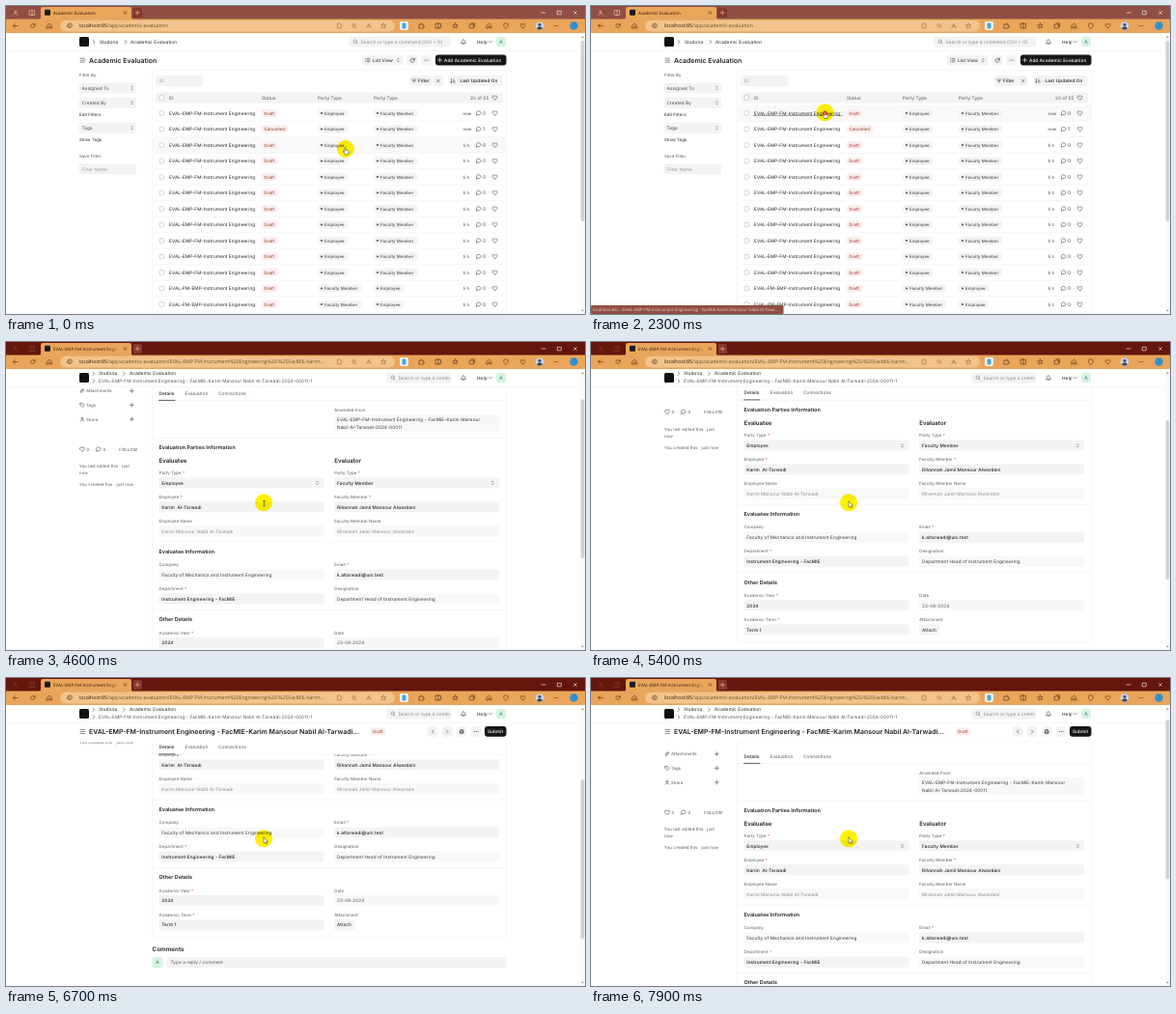
An HTML page for the animation above (8000 ms loop, 600 px wide and 319 px high).

```html
<!DOCTYPE html>
<html lang="en">
<head>
<meta charset="utf-8">
<title>Academic Evaluation</title>
<style>
html, body { margin: 0; width: 100%; height: 100%; overflow: hidden; background: #fff; }
svg { display: block; width: 600px; height: 319px; }
text { font-family: Inter, "Open Sans", sans-serif; text-rendering: geometricPrecision; white-space: pre; }
.ui text { font-family: "Open Sans", "Noto Sans", sans-serif; }
</style>
</head>
<body>
<svg id="stage" viewBox="0 0 600 319" xmlns="http://www.w3.org/2000/svg"></svg>
<script>
const INK = '#1f1f1f', GREY = '#555', SOFT = '#8a8a8a', FILL = '#f3f3f3', LINE = '#ececec';
const BAR = '#8f4f45', BAR_DARK = '#64150c', TOOL = '#e9a55a', PILL = '#f1c48c', BROWN = '#4a2a10';

const DEPT = 'Instrument Engineering', CODE = 'FacMIE';
const FULL = 'Karim Mansour Nabil Al-Tarwadi', SHORT = 'Karim\u00a0 Al-Tarwadi';
const PEER = 'Rihannah Jamil Mansour Alwardani';
const DOC = `EVAL-EMP-FM-${DEPT} - ${CODE}-${FULL}`;

// Drawing helpers; text is placed by its vertical centre.
const text = (x, y, str, { s = 4.69, w = 400, c = INK, ls = 0.02, a = 'start' } = {}) =>
  `<text x="${x}" y="${y + s * 0.364}" font-size="${s}" font-weight="${w}" fill="${c}" text-anchor="${a}" letter-spacing="${ls * s}">${str}</text>`;
const small = (x, y, str, c = GREY, w = 400) => text(x, y, str, { s: 4.33, c, w });
const rect = (x, y, w, h, fill, r = 0, extra = '') =>
  `<rect x="${x}" y="${y}" width="${w}" height="${h}" rx="${r}" fill="${fill}" ${extra}/>`;
const box = (x, y, w, h, r = 1) => rect(x, y, w, h, '#fff', r, 'stroke="#a8a8a8" stroke-width=".5"');
const icon = (x, y, d, c = '#444', sw = 0.6, fill = 'none') =>
  `<path transform="translate(${x} ${y})" d="${d}" fill="${fill}" stroke="${c}" stroke-width="${sw}" stroke-linecap="round" stroke-linejoin="round"/>`;
const hline = (x1, x2, y, c = LINE, sw = 0.5) => icon(0, 0, `M${x1} ${y}H${x2}`, c, sw);
const group = (id, body, attrs = '') => `<g id="${id}" ${attrs}>${body}</g>`;
const circle = (x, y, r, fill) => `<circle cx="${x}" cy="${y}" r="${r}" fill="${fill}"/>`;

const ICON = {
  heart: 'M0 2.3L-2.1.2C-3.2-1-2-2.5-.8-1.9L0-1.2 .8-1.9C2-2.5 3.2-1 2.1.2Z',
  bubble: 'M-2.2 2.1L-1.8 1C-3.2-.8-1.5-2.1 0-2.1 3-2.1 3 1.7 0 1.7L-.9 1.6Z',
  right: 'M-.8-1.6L.8 0-.8 1.6', left: 'M.8-1.6L-.8 0 .8 1.6', down: 'M-1.4-.7L0 .7 1.4-.7',
  updown: 'M-.8-.9L0-1.7 .8-.9M-.8 .9L0 1.7 .8 .9',
  plus: 'M-2 0H2M0-2V2', cross: 'M-1.4-1.4L1.4 1.4M1.4-1.4L-1.4 1.4',
  refresh: 'M2-.6A2.1 2.1 0 1 0 1.8 1.1M2.3-2.2V-.5H.7',
  dots: 'M-1.8 0h.01M0 0h.01M1.8 0h.01',
  menu: 'M-2.2-2H2.2M-2.2 0H2.2M-2.2 2H2.2',
  search: 'M1 1L2.2 2.2M1.4-.3A1.7 1.7 0 1 1-2-.3A1.7 1.7 0 1 1 1.4-.3',
  bell: 'M-2.2 1.4C-1.2.6-1.6-2.4 0-2.4S1.2.6 2.2 1.4ZM-.5 2.3H.5',
  home: 'M-2.5-.2L0-2.5 2.5-.2V2.5H.8V.6H-.8V2.5H-2.5Z',
  star: 'M0-2.7L.8-.8 2.7-.7 1.2.6 1.7 2.5 0 1.4-1.7 2.5-1.2.6-2.7-.7-.8-.8Z',
  square: 'M-2.4-1.4H1.4V2.4H-2.4ZM-1.2-2.6H2.6V1.2',
  split: 'M-2.6-2.3H2.6V2.3H-2.6ZM0-2.8V2.8',
  page: 'M-1.8-2.3H.6L1.8-1.1V2.3H-1.8Z',
  puzzle: 'M-2.2-1.2H-.6C-1.2-3.2 1.2-3.2.6-1.2H1.8V.2C3.6-.2 3.6 1.8 1.8 1.4V2.6H-2.2Z',
  letter: 'M-2 2L0-2.2 2 2M-1.2.5H1.2',
  shield: 'M0-2.6L2.2-1.7V.2C2.2 1.5 1.2 2.3 0 2.8-1.2 2.3-2.2 1.5-2.2.2V-1.7Z',
  back: 'M2.5 0H-2.5M-.5-2L-2.5 0-.5 2',
  person: 'M-1-.9A1 1 0 1 1 1-.9A1 1 0 1 1-1-.9M-2 2.1C-1.8.3 1.8.3 2 2.1',
  clip: 'M-1.9.4L.2-1.7C1.3-2.7 2.5-1.3 1.5-.3L-.5 1.6C-1.2 2.2-2 1.4-1.4.8L.4-.9',
  tag: 'M-2-2H0L2.2.2 .2 2.2-2 0ZM-1-1h.01',
  print: 'M-1.2-.6V-2H1.2V-.6M-1.2 1.2H-2V-.6H2V1.2H1.2M-1.2.6H1.2V2H-1.2Z',
  filter: 'M-2-1.4H2M-1.2 0H1.2M-.5 1.4H.5',
  sort: 'M-1.3-2V2M-2.2 1.1L-1.3 2-.4 1.1M.8-1.5H1.4M.8 0H2M.8 1.5H2.6',
  list: 'M-2-1.6h.01M-2 0h.01M-2 1.6h.01M-.7-1.6H2.2M-.7 0H2.2M-.7 1.6H2.2'
};
const ic = (name, x, y, c, sw) => icon(x, y, ICON[name], c, sw);

function browser() {
  const tools = ['puzzle', 'split', 'star', 'square', 'home', 'shield', 'heart'];
  const inPill = ['page', 'search', 'letter', 'star'];
  const url = (rest) => text(76, 20.3, `localhost:85<tspan fill="#6e4c28">${rest}</tspan>`, { s: 5.2, c: '#2b1808', ls: 0 });
  const tab = (str, c) => text(49, 7, str, { s: 4.55, c, ls: 0 });
  return rect(0, 0, 600, 14, BAR) + group('barDark', rect(0, 0, 600, 14, BAR_DARK)) +
    group('barIcons', ic('person', 10, 7, '#f3cfa6') + ic('split', 27, 7, '#f3cfa6')) +
    icon(0, 0, 'M34 14Q36 14 36 12V3Q36 1 38 1H128Q130 1 130 3V12Q130 14 132 14Z', 'none', 0, TOOL) +
    rect(40, 3.8, 6, 6, '#1d1d1d', 1) +
    group('tabList', tab('Academic Evaluation', '#2b1808')) +
    group('tabForm', tab(`EVAL-EMP-FM-${DEPT.slice(0, 16)}`, 'url(#fade)')) +
    ic('cross', 123.5, 7, BROWN) + rect(131.5, 2, 9.5, 10, '#85382a', 1.5) + ic('plus', 136.2, 7, '#f3cfa6') +
    icon(557, 7, 'M-2 0H2', '#fff') + icon(573.5, 7, 'M-1.8-1.8H1.8V1.8H-1.8Z', '#fff') + ic('cross', 590, 7, '#fff') +
    rect(0, 13.5, 600, 14.5, TOOL) + ic('back', 10, 20.5, BROWN) + ic('refresh', 28, 20.5, BROWN) + ic('home', 45, 20.5, BROWN) +
    rect(56, 14.7, 347, 11.8, PILL, 5.9) +
    icon(66, 20.3, 'M-2.3 0A2.3 2.3 0 1 1 2.3 0A2.3 2.3 0 1 1-2.3 0M0-.2V1.2M0-1.1h.01', BROWN) +
    group('urlList', url('/app/academic-evaluation')) +
    group('urlForm', url(`/app/academic-evaluation/EVAL-EMP-FM-${DEPT.replace(' ', '%20')}%20-%20${CODE}-${FULL.split(' ')[0]}...`)) +
    inPill.map((n, i) => ic(n, 345.5 + 15.2 * i, 20.5, '#9b6b35')).join('') +
    rect(408, 16, 9, 9, '#eef6fb', 2) + rect(410.5, 17.5, 4, 6, '#4aa3d8', 1) +
    tools.map((n, i) => ic(n, 430.5 + 17.5 * i, 20.5, BROWN)).join('') +
    circle(553, 20.5, 4.3, '#c9d6e6') + circle(553, 19.2, 1.5, '#3b4a66') +
    icon(553, 20.5, 'M-2.8 3.1C-2.4-.1 2.4-.1 2.8 3.1Q0 5.2-2.8 3.1Z', 'none', 0, '#3b4a66') +
    ic('dots', 570, 20.5, BROWN, 1) + circle(588.5, 20.5, 4.2, '#2f8fd0');
}

function navbar() {
  const find = (x, label) => rect(x, 31.5, 461 - x, 11, FILL, 3) + ic('search', x + 7, 37, '#777') + text(x + 12.5, 37, label, { c: '#888' });
  return rect(0, 28, 595, 18.6, '#fff') + hline(0, 595, 46.6) + rect(76, 32, 10, 10, '#111', 1.5) +
    group('navList', ic('right', 91, 37) + text(97, 37, 'Studoria') + ic('right', 124, 37) + text(129, 37, 'Academic Evaluation') +
      find(355, 'Search or type a command (Ctrl + G)')) +
    group('navForm', ic('right', 91, 32.7) + text(96, 32.7, 'Studoria') + ic('right', 122.5, 32.7) + text(128, 32.7, 'Academic Evaluation') +
      ic('right', 91, 40.3) + text(96, 40.3, DOC + '-2024-00011-1', { c: GREY }) + find(394, 'Search or type a comm')) +
    ic('bell', 474, 37) + text(488, 37, 'Help') + ic('down', 502, 37.2) +
    rect(508, 32, 10, 10, '#d5f3e3', 2.5) + text(513, 37, 'A', { s: 5, c: '#2a7a52', a: 'middle' });
}

const button = (x, w, name) => rect(x, 50.7, w, 11, FILL, 3) + ic(name, x + w / 2, 56.2, '#333', name === 'dots' ? 0.9 : 0.6);
const darkButton = (x, w, label, lx) => rect(x, 50.6, w, 10.8, '#171717', 3) + text(lx, 56, label, { c: '#fff', w: 500 });
const title = (str) => ic('menu', 79.3, 56.2) + text(86, 56.2, str, { s: 6.95, w: 600, ls: 0 });
const state = (x, y, w, label) => rect(x, y - 4, w, 8, '#faeeec', 3) + small(x + 2.5, y, label, '#a8473d', 450);

const ROW0 = 111, STEP = 16.5, ROWS = 13;
const rowY = (i) => ROW0 + STEP * i;

function badge(x, y, label) {
  const w = label.length > 8 ? 45.5 : 31.5;
  return rect(x, y - 4, w, 8, FILL, 3) + circle(x + 4, y, 0.9, '#333') + small(x + 7, y, label, '#383838');
}

function listRow(i) {
  const y = rowY(i), cancelled = i === 1, swap = i >= 11;
  const kinds = ['Employee', 'Faculty Member'];
  if (swap) kinds.reverse();
  return box(159, y - 2.3, 4.6, 4.6) +
    `<g clip-path="url(#idCol)">${text(169, y, `EVAL-${swap ? 'FM-EMP' : 'EMP-FM'}-${DEPT}`)}</g>` +
    (cancelled ? state(265, y, 27, 'Cancelled') : state(265, y, 16.5, 'Draft')) +
    badge(323, y, kinds[0]) + badge(381, y, kinds[1]) +
    small(473.5, y, i < 2 ? 'now' : '5 h', '#383838') + ic('bubble', 489.7, y) + text(494, y, cancelled ? '1' : '0', { s: 5.05, c: '#444' }) +
    small(499.7, y, '·') + ic('heart', 506.5, y) + hline(155, 515, y + 8.3);
}

function listPage() {
  const select = (y, label) => rect(75.5, y - 5.5, 59.5, 11, FILL, 3) + text(78.5, y, label, { c: '#444' }) + ic('updown', 130.5, y);
  const head = (x, s) => text(x, 95, s, { c: GREY });
  let out = rect(0, 46, 595, 273, '#fff') + title('Academic Evaluation') +
    rect(369, 50.7, 42, 11, FILL, 3) + ic('list', 374.7, 56.2) + text(380, 56.2, 'List View') + ic('updown', 406.3, 56.2) +
    button(415.5, 11.5, 'refresh') + button(430, 11.5, 'dots') +
    darkButton(445, 73.5, 'Add Academic Evaluation', 454) + ic('plus', 449.6, 56, '#fff') +
    small(76, 71.5, 'Filter By') + select(85, 'Assigned To') + select(100.3, 'Created By') + small(76, 112.3, 'Edit Filters', INK) +
    select(126.3, 'Tags') + small(76, 138, 'Show Tags', INK) + small(76, 155.7, 'Save Filter') +
    rect(75.5, 163.3, 59.5, 11, FILL, 3) + text(78.5, 168.8, 'Filter Name', { c: '#999' }) +
    icon(0, 0, 'M151.5 319V69Q151.5 66.5 154 66.5H516Q518.5 66.5 518.5 69V319', LINE, 0.5) +
    rect(155, 72, 49.5, 11, FILL, 3) + text(159, 77.5, 'ID', { c: '#999' }) +
    rect(418, 72, 23.5, 11, FILL, 3) + ic('filter', 422.8, 77.5) + text(427, 77.5, 'Filter', { w: 500 }) +
    rect(442.3, 72, 11, 11, FILL, 3) + ic('cross', 447.8, 77.5) +
    rect(458, 72, 56.5, 11, FILL, 3) + ic('sort', 462.8, 77.5) + text(470.5, 77.5, 'Last Updated On', { w: 500 }) +
    rect(155, 89.5, 360, 11, FILL, 3) + box(159, 92.7, 4.6, 4.6) + head(169, 'ID') + head(265, 'Status') +
    head(323, 'Party Type') + head(381, 'Party Type') + head(481, '20 of 55') + ic('heart', 506.5, 95) +
    `<rect id="hover" x="152" width="366" height="16.2" fill="#f9f9f9"/>`;
  for (let i = 0; i < ROWS; i++) out += listRow(i);
  return out + group('underline', hline(169, 260.5, 113.5, INK, 0.4));
}

function field(x, y, label, value, { need = 0, w = 400, c = INK, fill = FILL, pick = 0 } = {}) {
  const star = need ? ' <tspan fill="#d8453b">*</tspan>' : '';
  return small(x + 0.3, y, label + star) + rect(x, y + 5, 171.3, 11, fill, 3) +
    text(x + 3, y + 10.6, value, { w, c }) + (pick ? ic('updown', x + 164.3, y + 10.6) : '');
}

function formPage() {
  const L = 158.3, R = 340;
  const read = { fill: '#f8f8f8', c: '#383838' }, dim = { fill: '#f8f8f8', c: SOFT };
  const link = { need: 1, w: 500 }, pick = { need: 1, w: 450, pick: 1 };
  const heading = (y, s) => text(158.5, y, s, { s: 5.42, w: 600, ls: 0.005 });
  const sub = (x, s) => text(x, 163.5, s, { s: 6.1, w: 600, ls: 0 });
  const side = [['person', 'Assigned To', 76.7], ['clip', 'Attachments', 91.7], ['tag', 'Tags', 106.3], ['person', 'Share', 121]];
  return side.map(([n, s, y]) => ic(n, 79, y) + small(83, y, s) + ic('plus', 130.3, y)).join('') +
    ic('heart', 79, 152.1) + small(83.6, 152.1, '0') + small(89, 152.1, '·') + ic('bubble', 95.8, 152.1) + small(100.4, 152.1, '0') +
    small(117.3, 152.1, 'FOLLOW', '#444') + small(76, 169.7, 'You last edited this · just') + small(76, 176.7, 'now') +
    small(76, 188.7, 'You created this · just now') +
    rect(151.5, 66.5, 367, 324.5, 'none', 3, `stroke="${LINE}" stroke-width=".5"`) +
    rect(151.5, 68.3, 367, 11.5, '#e9f5fd', 2) + text(155, 74.2, 'Submit this document to confirm', { s: 4.5, c: '#1072ab' }) +
    ic('cross', 513.7, 74.2, '#333') +
    small(340.3, 111.2, 'Amended From') + rect(R, 116, 171.3, 17.6, '#f8f8f8', 3) +
    text(343, 121.5, `EVAL-EMP-FM-${DEPT} - ${CODE}-Karim Mansour`, { c: '#383838' }) +
    text(343, 129, 'Nabil Al-Tarwadi-2024-00011', { c: '#383838' }) +
    hline(152, 518, 140.5) + heading(149.7, 'Evaluation Parties Information') + sub(158.5, 'Evaluatee') + sub(340.3, 'Evaluator') +
    field(L, 176.3, 'Party Type', 'Employee', pick) + field(R, 176.3, 'Party Type', 'Faculty Member', pick) +
    field(L, 201.3, 'Employee', SHORT, link) + field(R, 201.3, 'Faculty Member', PEER, link) +
    field(L, 226.3, 'Employee Name', FULL, dim) + field(R, 226.3, 'Faculty Member Name', PEER, dim) +
    hline(152, 518, 248) + heading(257.9, 'Evaluatee Information') +
    field(L, 271.4, 'Company', `Faculty of Mechanics and ${DEPT}`, read) + field(R, 271.4, 'Email', 'k.altarwadi@uni.test', { need: 1, w: 450 }) +
    field(L, 296.6, 'Department', `${DEPT} - ${CODE}`, link) + field(R, 296.6, 'Designation', `Department Head of ${DEPT}`, read) +
    hline(152, 518, 318.5) + heading(328.4, 'Other Details') +
    field(L, 342, 'Academic Year', '2024', { need: 1, w: 450 }) + field(R, 342, 'Date', '23-08-2024', { c: GREY, fill: '#f8f8f8' }) +
    field(L, 367.2, 'Academic Term', 'Term 1', { need: 1, w: 450 }) + small(340.3, 367.2, 'Attachment') +
    rect(R, 372.2, 21.5, 11, FILL, 3) + text(343, 377.8, 'Attach') +
    text(151.5, 402.3, 'Comments', { s: 6.3, w: 600, ls: 0 }) + rect(151.5, 411, 11, 11, '#d5f3e3', 3) +
    text(157, 416.5, 'A', { s: 4.8, c: '#2a7a52', a: 'middle' }) + rect(166.5, 411, 352, 11, FILL, 3) +
    text(170.5, 416.5, 'Type a reply / comment', { c: GREY });
}

function formTabs() {
  return rect(151.8, -7.5, 366.4, 15, '#fff') + hline(152, 518, 7.5) + text(158.5, 0, 'Details', { w: 500 }) +
    text(185.5, 0, 'Evaluation', { c: GREY }) + text(220, 0, 'Connections', { c: GREY }) + hline(158.5, 175, 7.4, INK, 0.7);
}

function formHead() {
  return rect(0, 46, 595, 20.5, '#fff') + '<g transform="translate(0 -.7)">' + title(DOC + '...') + state(377.8, 56.2, 16, 'Draft') +
    button(437, 10.5, 'left') + button(452, 10.5, 'right') + button(467, 10.5, 'print') + button(482, 10.5, 'dots') +
    darkButton(496, 22.5, 'Submit', 499) + '</g>';
}

const scrollbar = () => rect(595, 28, 5, 291, '#fafafa') + icon(597.5, 32, 'M-1.3.8L0-.8 1.3.8Z', 'none', 0, '#777') +
  icon(597.5, 315.5, 'M-1.3-.8L0 .8 1.3-.8Z', 'none', 0, '#777') + '<rect id="thumb" x="595.6" width="3.8" rx="1.9" fill="#d2d2d2"/>';

const pointer = () =>
  group('hand', icon(0, 0, 'M-.8 5.8L-2.6 2.6Q-2.2 1.8-1.2 2.8V-1.2Q-.4-2.2.3-1.2V1.4Q2.8 1.4 3.2 2.4V4L2.4 5.8Z', '#222', 0.5, '#fff')) +
  group('arrow', icon(1, 0, 'M-1-1.2V5L.5 3.8 1.4 5.8 2.3 5.4 1.5 3.5H3.3Z', '#222', 0.45, '#fff')) +
  group('beam', icon(0.5, 0.8, 'M-1-2.5H1M0-2.5V2.5M-1 2.5H1', '#222', 0.5)) +
  group('click', `<circle id="ring" cy=".8" fill="none" stroke="#e0261b" stroke-width="1.2"/>`);

const stage = document.getElementById('stage');
stage.innerHTML = `<defs><clipPath id="idCol"><rect x="169" y="100" width="91.5" height="219"/></clipPath>
  <linearGradient id="fade"><stop offset=".85" stop-color="#2b1808"/><stop offset="1" stop-color="#2b1808" stop-opacity=".15"/></linearGradient></defs>` +
  rect(0, 0, 600, 319, '#fff') + group('list', listPage()) +
  group('form', group('body', formPage()) + group('tabs', formTabs()) + group('head', formHead())) +
  navbar() + scrollbar() + group('chrome', browser(), 'class="ui"') +
  group('status', rect(0, 310, 199.5, 9, BAR, 1) +
    text(2, 314.6, `localhost:85/.../${DOC.slice(0, -3)}...`, { s: 4.4, c: '#f0d6c4', ls: 0 }), 'class="ui"') +
  group('spot', circle(0, 0, 9, '#fff200'), 'style="mix-blend-mode:multiply"') + group('cursor', pointer());

const el = {};
stage.querySelectorAll('[id]').forEach((n) => { el[n.id] = n; });
const show = (id, on) => { el[id].style.display = on ? '' : 'none'; };
const move = (id, x, y) => el[id].setAttribute('transform', `translate(${x} ${y})`);
const ease = (u) => u * u * (3 - 2 * u);

const PATH = [[0, 352, 148], [250, 334, 141], [500, 313, 130.5], [1100, 313, 130.5], [1500, 274, 119], [1900, 242.5, 110.3],
  [3400, 242.5, 110.3], [3500, 257.5, 123.2], [3700, 269, 152], [3900, 267, 166.3], [8000, 267, 166.3]];
const SCROLL = [[4100, 4600, 0, 41], [4800, 5500, 41, 82], [5700, 6600, 82, 124.5], [6600, 7500, 124.5, 52.3], [7500, 8000, 52.3, 8.4]];

function cursorAt(t) {
  const i = PATH.findIndex((p, k) => k > 0 && t <= p[0]);
  const [t0, x0, y0] = PATH[i - 1], [t1, x1, y1] = PATH[i];
  const u = (t - t0) / (t1 - t0);
  return [x0 + (x1 - x0) * u, y0 + (y1 - y0) * u];
}

function scrollAt(t) {
  let pos = 0;
  for (const [t0, t1, a, b] of SCROLL) if (t >= t0) pos = a + (b - a) * ease(Math.min(1, (t - t0) / (t1 - t0)));
  return pos;
}

function draw(t) {
  const [cx, cy] = cursorAt(t), off = scrollAt(t);
  const opened = t >= 2600, loaded = t >= 2800;
  const headOn = t < 4200 || t >= 6700;

  for (const k of ['tab', 'url', 'nav']) { show(k + 'List', !opened); show(k + 'Form', opened); }
  show('barDark', opened);
  el.barIcons.setAttribute('opacity', opened ? 0.25 : 1);
  show('list', !opened);
  show('form', loaded);

  const row = Math.round((cy - ROW0) / STEP);
  el.hover.setAttribute('y', rowY(row) - 8.1);
  const onLink = row === 0 && cx < 260.5;
  show('underline', onLink);
  show('status', onLink && t < 3200);

  move('body', 0, -off);
  move('tabs', 0, Math.max(94 - off, headOn ? 71.5 : 52.5));
  show('head', headOn);
  el.thumb.setAttribute('y', 36 + off * 0.565);
  el.thumb.setAttribute('height', loaded ? 165 : 187);

  move('spot', cx, cy);
  move('cursor', cx, cy);
  const beam = off > 39.5 && off < 50.5;
  show('hand', !opened);
  show('beam', beam);
  show('arrow', opened && !beam);
  show('click', t >= 2300 && t < 2500);
  el.ring.setAttribute('r', 1.8 + Math.max(0, t - 2300) / 60);
}

function tick(now) {
  draw(Math.floor((now % 8000 + 1) / 100) * 100 % 8000);
  requestAnimationFrame(tick);
}
draw(0);
requestAnimationFrame(tick);
</script>
</body>
</html>
```
